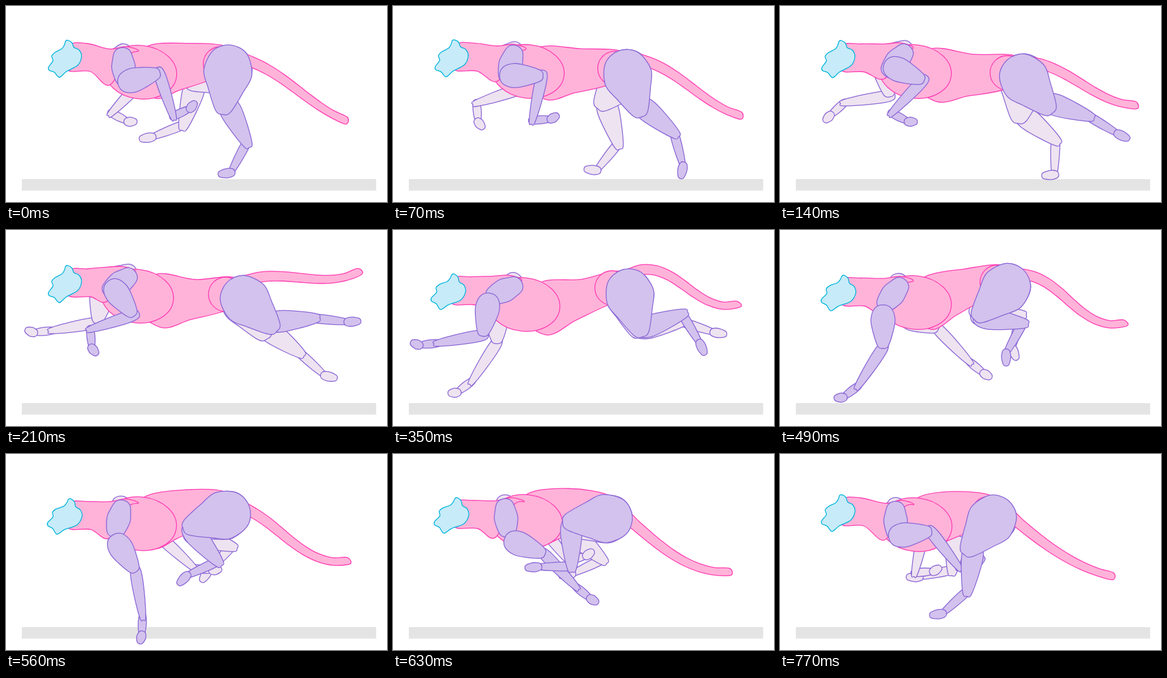
An HTML page with a canvas that plays this animation: 600x308 px, repeating every 840 ms.

```html
<!DOCTYPE html>
<html lang="en">
<head>
<meta charset="utf-8">
<title>Running cat</title>
<style>
html, body { margin: 0; width: 600px; height: 308px; overflow: hidden; background: #fff; }
canvas { display: block; }
</style>
</head>
<body>
<canvas id="stage" width="600" height="308"></canvas>
<script>
const ctx = document.getElementById('stage').getContext('2d');
const STEP = 70, STEPS = 12;

const PINK = ['#ffb3d9', '#ff3db3'];
const NEAR = ['#d3c2ed', '#8a66d6'];
const FAR = ['#eee3f0', '#8a66d6'];
const BLUE = ['#c7ebf8', '#00b4dc'];

// Key poses: each track holds one value (pixels or degrees) per time in KEYS.
const KEYS = [0, 2, 3, 5, 7, 9, 11];
const spine = {
  headX: [93, 92, 93, 88, 93, 93, 92],
  headY: [83, 83.5, 85, 97.5, 99.5, 97, 93],
  headTurn: [0, 0, 0, 8, 8, 8, 2],
  chestX: [212, 213, 207, 206, 213, 210, 214],
  chestY: [104, 103, 104, 117, 114, 106, 111],
  hipX: [350, 383, 375, 372, 357, 339, 335],
  hipY: [99, 113, 109, 99, 90, 101, 102],
  tailRoot: [18, 5, -22, -28, 5, 40, 40],
  tailMiddle: [37, 31, 5, 36, 40, 30, 31],
  tailTip: [16, -8, -40, -38, -35, -12, 8]
};
const foreleg = {
  blade: [73, 119, 132, 143, 118, 72, 78],
  reach: [38, 25, 27, 48, 52, 55, 38],
  arm: [-16, 23, 53, 100, 90, 22, -8],
  forearm: [72, 134, 162, 170, 123, 46, 52],
  wrist: [-25, 27, 85, 174, 143, 39, -16],
  paw: [-50, 0, 50, 201, 175, 30, -37]
};
const nearHindleg = {
  thigh: [97, 50, 44, 73, 135, 175, 129],
  shank: [63, 19, -5, -20, 8, 89, 98],
  heel: [118, 31, 6, 59, 119, 179, 138],
  paw: [172, 25, -4, 65, 90, 175, 172]
};
const farHindleg = {
  thigh: [160, 96, 60, 77, 140, 165, 170],
  shank: [106, 38, 36, -10, -1, 42, 96],
  heel: [159, 92, 42, 18, 104, 155, 168],
  paw: [171, 175, 13, 9, 68, 171, 180]
};
const FORELEG_LAG = 2;

const headShape = [
  1,-28, 5,-29, 11,-25, 14,-18, 22,-14, 26,-4, 20,10, 2,20, -9,29,
  -17,21, -25,18, -26,13, -19,3, -21,-4, -16,-10, -5,-16, -1,-22
];

// Cyclic Hermite interpolation of one track.
function sample(values, n) {
  const count = KEYS.length;
  const value = k => values[(k + count) % count];
  const time = k => KEYS[(k + count) % count] + Math.floor(k / count) * STEPS;
  const i = KEYS.findLastIndex(t => t <= n);
  const span = time(i + 1) - time(i), u = (n - time(i)) / span, v = 1 - u;
  const slope = k => (value(k + 1) - value(k - 1)) / (time(k + 1) - time(k - 1)) * span;
  return value(i) * v * v * (1 + 2 * u) + value(i + 1) * u * u * (3 - 2 * u)
    + slope(i) * u * v * v - slope(i + 1) * u * u * v;
}

function pose(tracks, n) {
  const result = {};
  for (const name in tracks) result[name] = sample(tracks[name], n % STEPS);
  return result;
}

// The point at a distance and direction from another point.
function along([x, y], degrees, distance) {
  const a = degrees * Math.PI / 180;
  return [x + Math.cos(a) * distance, y + Math.sin(a) * distance];
}

function paint([fill, line]) {
  ctx.closePath();
  ctx.fillStyle = fill;
  ctx.strokeStyle = line;
  ctx.fill();
  ctx.stroke();
}

// Smooth closed curve through flat x,y pairs.
function blob(p, colors) {
  const size = p.length, at = k => p[(k + size) % size];
  ctx.beginPath();
  ctx.moveTo(p[0], p[1]);
  for (let i = 0; i < size; i += 2) {
    const out = k => at(i + k) + (at(i + k + 2) - at(i + k - 2)) / 6;
    const into = k => at(i + k + 2) - (at(i + k + 4) - at(i + k)) / 6;
    ctx.bezierCurveTo(out(0), out(1), into(0), into(1), at(i + 2), at(i + 3));
  }
  paint(colors);
}

// Slightly bulging limb part between two round ends.
function bone([x, y], degrees, length, r0, r1, colors) {
  const middle = (r0 * .4 + r1 * .6) * 1.1;
  const side = [[-.7 * r0, .7 * r0], [.1 * length, r0], [.6 * length, middle], [length + .7 * r1, .7 * r1]];
  const mirrored = side.map(([u, v]) => [u, -v]).reverse();
  ctx.save();
  ctx.translate(x, y);
  ctx.rotate(degrees * Math.PI / 180);
  blob([[-r0, 0], ...side, [length + r1, 0], ...mirrored].flat(), colors);
  ctx.restore();
}

function drawHindleg(hip, leg, colors) {
  const knee = along(hip, leg.thigh - 8, 60);
  const ankle = along(knee, leg.shank, 62);
  const knuckle = along(ankle, leg.heel, 54);
  bone(ankle, leg.heel, 54, 7, 5, colors);
  bone(knuckle, leg.paw, 14, 7, 6, colors);
  bone(knee, leg.shank, 62, 17, 9, colors);
  bone(hip, leg.thigh, 55, 38, 17, colors);
}

function drawForeleg(top, leg, colors) {
  const shoulder = along(top, leg.blade, leg.reach);
  const elbow = along(shoulder, leg.arm, 48);
  const wrist = along(elbow, leg.forearm, 72);
  const knuckle = along(wrist, leg.wrist, 30);
  bone(wrist, leg.wrist, 26, 6, 5.5, colors);
  bone(knuckle, leg.paw, 8, 7, 6, colors);
  bone(elbow, leg.forearm, 72, 9, 6, colors);
  bone(top, leg.blade + 12, 27, 16.5, 17, colors);
  bone(shoulder, leg.arm, 38, 19, 11.5, colors);
}

// The direction bends quadratically from root over middle to tip.
function drawTail(point, { tailRoot, tailMiddle, tailTip }) {
  const upper = [], lower = [], parts = 8;
  for (let i = 0; i <= parts; i++) {
    const s = i / parts, radius = 8.5 - 3 * s;
    const bend = tailRoot * (1 - s) * (1 - 2 * s) + tailMiddle * 4 * s * (1 - s) + tailTip * s * (2 * s - 1);
    upper.push(...along(point, bend - 90, radius));
    lower.unshift(...along(point, bend + 90, radius));
    point = along(point, bend, 195 / parts);
  }
  blob([...upper, ...lower], PINK);
}

// Belly and neck hang between head, chest and hip; stretch runs from -1 to 1.
function drawTorso({ headX, headY, chestX, chestY, hipX, hipY }, stretch) {
  const head = (x, y) => [headX + x, headY + y];
  const chest = (x, y) => [chestX + x, chestY + y];
  const hip = (x, y) => [hipX + x, hipY + y];
  const between = (a, b, lift) => [(a[0] + b[0]) / 2, (a[1] + b[1]) / 2 + lift];

  const withers = chest(14 + 16 * stretch, -38 + 4 * stretch);
  const rump = hip(-4 - 10 * stretch, -34);
  const groin = hip(-36, 20);
  const belly = chest(26 + 10 * stretch, 43 + 6 * stretch);
  blob([
    withers, between(withers, rump, 9 * stretch - 3), rump, hip(15, 0),
    groin, between(groin, belly, 0), belly, chest(-15, 5)
  ].flat(), PINK);

  ctx.beginPath();
  ctx.ellipse(chestX, chestY, 57, 42, .12, 0, 2 * Math.PI);
  paint(PINK);
  ctx.beginPath();
  ctx.arc(...hip(-17 - 13 * stretch, -8), 27, 0, 2 * Math.PI);
  paint(PINK);

  blob([
    head(7, -21), head(35, -24), chest(-49, -39 - 7 * stretch), chest(-23, -42 - 5 * stretch),
    chest(-3, -35 - 4 * stretch), chest(-20, -26), chest(-49, 17 - 9 * stretch), head(40, 20), head(4, 17)
  ].flat(), PINK);
}

function drawHead({ headX, headY, headTurn }) {
  ctx.save();
  ctx.translate(headX, headY);
  ctx.rotate(headTurn * Math.PI / 180);
  blob(headShape, BLUE);
  ctx.restore();
}

function draw(n) {
  const s = pose(spine, n);
  const stretch = Math.cos((n - 3.7) / STEPS * 2 * Math.PI);
  const hip = [s.hipX, s.hipY];
  const blade = [s.chestX - 25 + 9 * stretch, s.chestY - 24 - 5 * stretch];

  ctx.fillStyle = '#fff';
  ctx.fillRect(0, 0, 600, 308);
  ctx.fillStyle = '#e4e4e4';
  ctx.fillRect(25, 272, 558, 18);
  ctx.lineWidth = 1.3;

  drawHindleg(hip, pose(farHindleg, n), FAR);
  drawForeleg([blade[0], blade[1] - 6], pose(foreleg, n + FORELEG_LAG), FAR);
  drawTail(along(hip, -60 - 53 * stretch, 25), s);
  drawTorso(s, stretch);
  drawForeleg(blade, pose(foreleg, n), NEAR);
  drawHindleg(hip, pose(nearHindleg, n), NEAR);
  drawHead(s);
}

const start = performance.now();
function tick() {
  draw(Math.floor((performance.now() - start) / STEP) % STEPS);
  requestAnimationFrame(tick);
}
tick();
</script>
</body>
</html>
```
